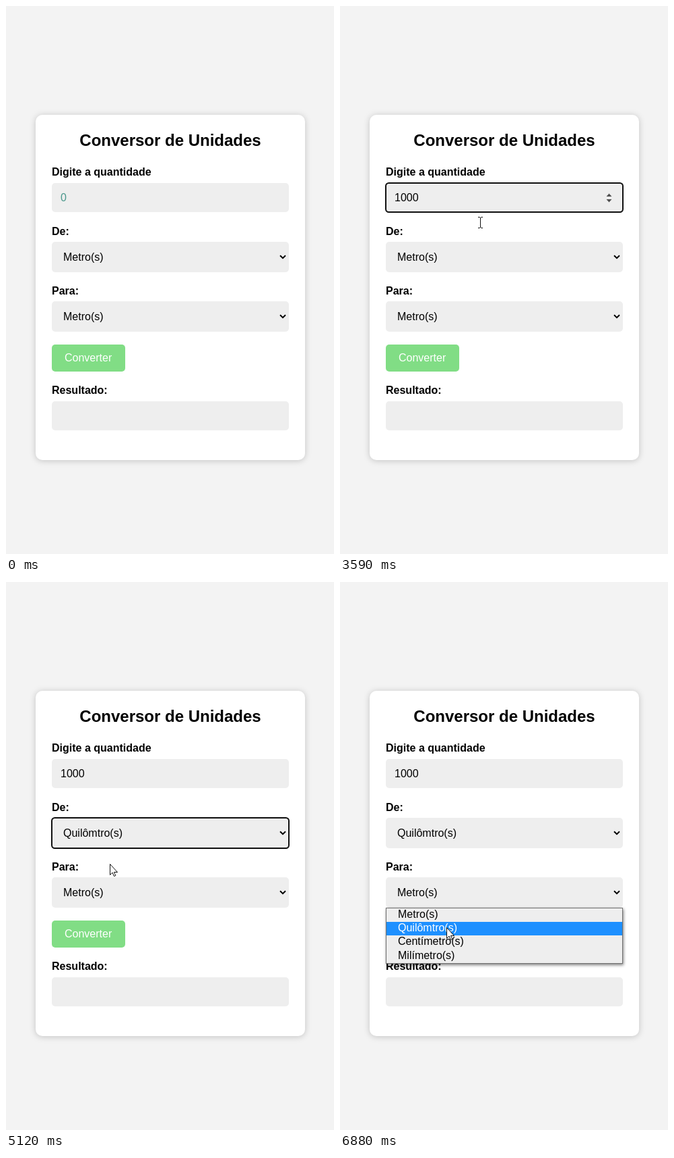
These frames come from a looping animation (487 by 811 pixels, 8 s). An HTML page:

```html
<!DOCTYPE html>
<html lang="pt-BR">
<head>
<meta charset="utf-8">
<title>Conversor de Unidades</title>
<style>
  html, body { margin: 0; width: 100%; height: 100%; overflow: hidden; background: #f3f3f3; }
  svg { display: block; width: 487px; height: 811px; }
  text { font: 16px "Liberation Sans", Arial, sans-serif; fill: #000; }
  .bold { font-weight: bold; }
  .title { font-size: 24px; font-weight: bold; text-anchor: middle; }
  .field { fill: #eee; }
  .chevron { fill: none; stroke: #000; stroke-width: 2; }
  .card { fill: #fff; filter: drop-shadow(0 1px 5px rgba(0, 0, 0, .2)); }
  .menu { fill: #eee; stroke: #6f6f6f; }
  #menu { filter: drop-shadow(1px 2px 2.2px rgba(0, 0, 0, .5)); }
</style>
</head>
<body>
<svg viewBox="0 0 487 811">
  <rect width="487" height="811" fill="#f3f3f3"/>
  <rect class="card" x="44" y="161" width="400" height="511" rx="10"/>
  <text class="title" x="244" y="207">Conversor de Unidades</text>
  <text class="bold" x="68" y="251">Digite a quantidade</text>
  <text class="bold" x="68" y="339">De:</text>
  <text class="bold" x="68" y="427">Para:</text>
  <text class="bold" x="68" y="574">Resultado:</text>

  <rect class="field" x="68" y="262" width="352" height="43" rx="5"/>
  <rect class="field" x="68" y="349" width="352" height="45" rx="5"/>
  <rect class="field" x="68" y="437" width="352" height="45" rx="5"/>
  <rect class="field" x="68" y="585" width="352" height="43" rx="5"/>
  <path class="chevron" d="M407 369.2l4 4l4-4M407 457.2l4 4l4-4"/>

  <text id="amount" x="81" y="289"></text>
  <rect id="caret" y="275" width="1" height="17"/>
  <path id="spin" fill="#505050" d="M395.5 282h8l-4-4.5zM395.5 286h8l-4 4.5z"/>
  <text id="from" x="85" y="377"></text>
  <text x="85" y="465">Metro(s)</text>

  <rect x="68" y="501" width="109" height="40" rx="5" fill="#81dd85"/>
  <text x="87" y="526" style="fill:#fff">Converter</text>

  <rect id="ring" x="68" width="352" rx="4.5" fill="none" stroke="#101010" stroke-width="2"/>

  <g id="menu">
    <rect class="menu" x="68.5" y=".5" width="351" height="82"/>
    <rect id="mark" x="69" width="350" height="20" fill="#1e90ff"/>
  </g>

  <g id="pointer">
    <circle id="press" r="12" cx=".5" cy=".5" fill="#f8f06e" fill-opacity=".92"/>
    <path id="arrow" fill="#fff" stroke="#111" d="M.5.5V16.5L4 13L6.5 18.5L8.8 17.5L6.4 12.5H11.5z"/>
    <path id="beam" fill="none" stroke="#111" d="M-3-7.5H-1L.5-6.5L2-7.5H4M.5-6.5V7.5M-3 8.5H-1L.5 7.5L2 8.5H4"/>
  </g>
</svg>
<script>
const LOOP = 8000;
const UNITS = ["Metro(s)", "Quilômtro(s)", "Centímetro(s)", "Milímetro(s)"];
const BASELINES = [15, 35, 55, 76];
const ROW = 20.25;

// start, end, number of positions, from, to
const MOVES = [
  [570, 1060, 8, [362, 608], [203, 289]],
  [3590, 3960, 6, [208, 320], [200, 371]],
  [4330, 4530, 4, [194, 376], [154, 416]],
  [4670, 4670, 1, [154, 417], [154, 417]],
  [5460, 5660, 4, [154, 421], [157, 452]],
  [6460, 6880, 7, [157, 454], [158, 511]]
];
const PRESSES = [[1190, 1250], [4050, 4120], [5060, 5120], [5800, 5860]];
const KEYS = [2180, 2390, 2590, 2780];
const CARET = [[1190, 1720], [2180, 3260]];
const MENUS = [[4050, 5120, 394], [5800, LOOP, 482]];
const RINGS = [[1190, 4050, 262, 43], [5120, 5800, 349, 45]];

const $ = id => document.getElementById(id);
const active = (list, t) => list.find(([a, b]) => t >= a && t < b);
const show = (id, on) => $(id).setAttribute("visibility", on ? "inherit" : "hidden");
const smooth = p => p * p * (3 - 2 * p);

const options = UNITS.map((name, i) => {
  const el = document.createElementNS("http://www.w3.org/2000/svg", "text");
  el.setAttribute("x", 86);
  el.setAttribute("y", BASELINES[i]);
  el.textContent = name;
  $("menu").append(el);
  return el;
});

function pointerAt(t) {
  const move = MOVES.filter(m => t >= m[0]).pop();
  if (!move) return null;
  const [start, end, count, a, b] = move;
  const last = count - 1;
  const step = last ? Math.min(last, Math.floor((t - start) / (end - start) * last + 1e-6)) : 0;
  const p = last ? smooth(step / last) : 1;
  return a.map((v, i) => Math.round(v + (b[i] - v) * p));
}

function drawMenu(t, pos) {
  const menu = active(MENUS, t);
  $("menu").style.display = menu ? "" : "none";
  if (!menu) return;
  const top = menu[2];
  const row = Math.max(0, Math.min(3, Math.floor((pos[1] - top - 1) / ROW)));
  $("menu").setAttribute("transform", `translate(0 ${top})`);
  $("mark").setAttribute("y", 1 + Math.round(row * ROW));
  options.forEach((el, i) => el.style.fill = i === row ? "#fff" : "#000");
}

function draw(t) {
  const pos = pointerAt(t);
  const typed = KEYS.filter(k => t >= k).length;
  const ring = active(RINGS, t);

  $("amount").textContent = typed ? "1000".slice(0, typed) : "0";
  $("amount").style.fill = typed ? "#000" : "#4a988c";
  $("caret").setAttribute("x", Math.floor(81 + 8.9 * typed));
  show("caret", active(CARET, t));
  $("from").textContent = UNITS[t >= 5120 ? 1 : 0];

  show("ring", ring);
  if (ring) {
    $("ring").setAttribute("y", ring[2]);
    $("ring").setAttribute("height", ring[3]);
  }
  const hover = pos && pos[1] >= 262 && pos[1] < 305;
  show("spin", hover || (ring && ring[2] === 262));

  drawMenu(t, pos);

  show("pointer", pos);
  if (pos) {
    const text = pos[1] < 322;
    $("pointer").setAttribute("transform", `translate(${pos})`);
    show("beam", text);
    show("arrow", !text);
  }
  show("press", active(PRESSES, t));
}

const begin = performance.now();
function tick() {
  draw((performance.now() - begin) % LOOP);
  requestAnimationFrame(tick);
}
tick();
</script>
</body>
</html>
```
